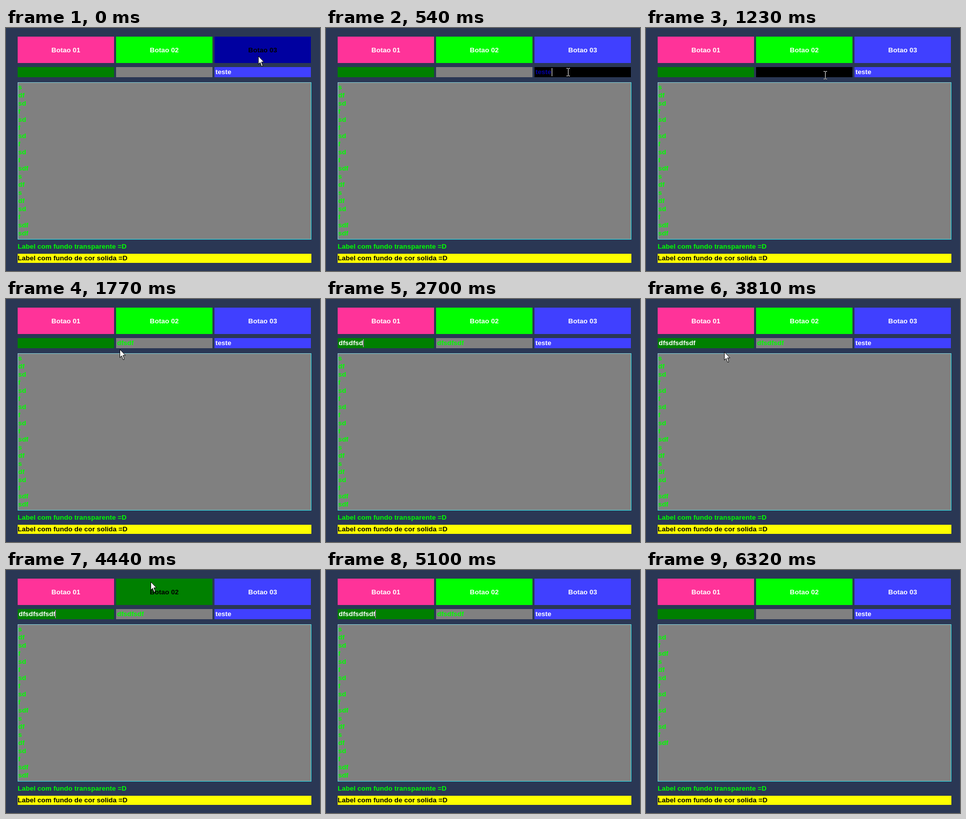
An HTML page that plays this animation: 619 px wide and 479 px high, repeating every 6390 ms.

```html
<!DOCTYPE html>
<html lang="pt">
<head>
<meta charset="utf-8">
<title>Botoes</title>
<style>
  html, body { margin: 0; width: 100%; height: 100%; overflow: hidden; background: #2a3754; }
  svg { display: block; }
  text { font: bold 13.333px "Liberation Sans", Arial, sans-serif; white-space: pre; }
  .wide { letter-spacing: .085px; }
  .invert { mix-blend-mode: difference; }
</style>
</head>
<body>
<svg id="stage" width="619" height="479" viewBox="0 0 619 479"></svg>
<script>
const LOOP = 6390;
const stage = document.getElementById('stage');

function add(tag, attrs, parent = stage) {
  const el = document.createElementNS('http://www.w3.org/2000/svg', tag);
  for (const k in attrs) el.setAttribute(k, attrs[k]);
  parent.append(el);
  return el;
}
const rect = (x, y, width, height, fill) => add('rect', { x, y, width, height, fill });
function label(x, y, fill, str = '', extra = {}) {
  const el = add('text', { x, y, fill, ...extra });
  el.textContent = str;
  return el;
}
const show = (el, on) => el.setAttribute('visibility', on ? 'visible' : 'hidden');

rect(0, 0, 619, 479, '#2a3754');

// Colours: [normal fill, normal text, hover fill, hover text]
const skins = {
  b0: ['#ff3399', '#fff', '#800040', '#000'],
  b1: ['#00ff00', '#fff', '#008000', '#000'],
  b2: ['#4040ff', '#fff', '#0000a0', '#000'],
  t0: ['#008000', '#fff', '#000', '#008000'],
  t1: ['#808080', '#0f0', '#000', '#008000'],
  t2: ['#4040ff', '#fff', '#000', '#0000a0']
};
const left = i => 23 + 194 * i;
const parts = {};
for (let i = 0; i < 3; i++) {
  parts['b' + i] = {
    box: rect(left(i), 17, 190, 52),
    text: label(left(i) + 95, 48, '#fff', 'Botao 0' + (i + 1), { 'text-anchor': 'middle', class: 'wide' })
  };
  parts['t' + i] = { box: rect(left(i), 77, 190, 20), text: label(left(i) + 2, 91, '#fff') };
}
const marked = rect(413, 79, 32, 16, '#3399ff');
const markedText = label(413, 91, '#fff', 'teste');

// Multi-line field
rect(23, 107, 579, 310, '#2ee6ee');
rect(23, 107, 578, 1, '#86d4dc');
rect(23, 107, 1, 309, '#86d4dc');
rect(24, 108, 577, 308, '#808080');
const rows = Array.from({ length: 19 }, (_, i) => label(24, 121 + 16 * i, '#0f0'));

label(23, 435, '#0f0', 'Label com fundo transparente =D', { class: 'wide' });
rect(23, 445, 579, 18, '#ff0');
label(23, 458, '#000', 'Label com fundo de cor solida =D', { class: 'wide' });

const caret = add('rect', { y: 79, width: 1, height: 16, fill: '#fff', class: 'invert' });
const arrow = add('path', {
  d: 'M.5 .5V16.5L4 13L6.8 20.5H8.8V18L6.6 12H11.5Z', fill: '#fff', stroke: '#000'
});
const beam = add('path', {
  d: 'M0 0H3V1H4V0H7V1H4V15H7V16H4V15H3V16H0V15H3V1H0Z', fill: '#fff', class: 'invert'
});

const logA = 's df sd f sd f sd f sd f sdf s df s df sd f sdf sdf'.split(' ');
const logB = ' sd f sdf s df sd f sd f sd f sd f sdf'.split(' ');
const typed = n => 'dfs'.repeat(4).slice(0, n);
const at = (x, y) => ({ arrow: [x, y] });
const ibeam = (x, y) => ({ beam: [x, y] });
const none = {};

// Each step keeps the earlier values it does not set.
const steps = [
  [0, { cur: at(497, 55), hot: 'b2', t0: 0, t1: 0, focus: null, sel: 0, log: logA }],
  [120, { cur: at(491, 71), hot: null }],
  [270, { cur: at(478, 99) }],
  [400, { cur: at(467, 101) }],
  [540, { cur: ibeam(474, 79), hot: 't2', focus: 't2' }],
  [660, { cur: ibeam(402, 85), focus: null, sel: 5 }],
  [810, { cur: ibeam(356, 87) }],
  [960, { cur: ibeam(432, 83), sel: 2 }],
  [1080, { cur: ibeam(478, 79), sel: 0, focus: 't2' }],
  [1230, { cur: ibeam(350, 85), hot: 't1', focus: null }],
  [1350, { cur: ibeam(322, 84), focus: 't1' }],
  [1480, { cur: none, t1: 1 }],
  [1620, { cur: ibeam(322, 84), t1: 5 }],
  [1770, { cur: at(224, 99), hot: null, focus: null }],
  [1900, { cur: ibeam(192, 86), hot: 't0', t1: 8 }],
  [2160, { cur: none, t0: 1, focus: 't0' }],
  [2320, { cur: at(239, 87), hot: null, t0: 2 }],
  [2440, { cur: none, t0: 4 }],
  [2580, { t0: 6 }],
  [2700, { t0: 7 }],
  [2860, { t0: 8 }],
  [3000, { t0: 9 }],
  [3120, { t0: 11 }],
  [3540, { cur: at(126, 52), hot: 'b0', focus: null }],
  [3660, { cur: at(140, 40) }],
  [3810, { cur: at(154, 104), hot: null }],
  [3940, { cur: at(470, 45), hot: 'b2' }],
  [4080, { cur: at(446, 71), hot: null, focus: 't0' }],
  [4200, { cur: at(408, 87) }],
  [4320, { cur: at(330, 14) }],
  [4440, { cur: at(285, 23), hot: 'b1' }],
  [4590, { cur: none, hot: null, focus: null }],
  [4980, { cur: at(604, 413) }],
  [5100, { cur: none, focus: 't0' }],
  [5530, { focus: null }],
  [5940, { t0: 0, t1: 0, log: logB.slice(0, 12) }],
  [6080, { log: logB.slice(0, 13) }],
  [6200, { log: logB.slice(0, 14) }],
  [6320, { log: logB }]
];
let last = {};
const states = steps.map(([, change]) => last = { ...last, ...change });

const advance = { d: .611, f: .333, s: .556 };
function caretX(id, str) {
  if (id === 't2') return 445;
  const w = [...str].reduce((sum, c) => sum + advance[c], 0) * 13.333;
  return left(+id[1]) + 2 + Math.floor(w);
}

function place(el, pos) {
  show(el, pos);
  if (pos) el.setAttribute('transform', `translate(${pos})`);
}

function render(s) {
  const values = { t0: typed(s.t0), t1: typed(s.t1), t2: 'teste' };
  for (const id in parts) {
    const k = s.hot === id ? 2 : 0;
    parts[id].box.setAttribute('fill', skins[id][k]);
    parts[id].text.setAttribute('fill', skins[id][k + 1]);
    if (id in values) parts[id].text.textContent = values[id];
  }
  // The selection grows leftwards from the end of the word.
  const from = s.sel === 5 ? 413 : 432;
  show(marked, s.sel);
  show(markedText, s.sel);
  marked.setAttribute('x', from);
  marked.setAttribute('width', 445 - from);
  markedText.setAttribute('x', from);
  markedText.textContent = 'teste'.slice(5 - s.sel);

  rows.forEach((row, i) => row.textContent = s.log[i] || '');
  show(caret, s.focus);
  if (s.focus) caret.setAttribute('x', caretX(s.focus, values[s.focus]));
  place(arrow, s.cur.arrow);
  place(beam, s.cur.beam);
}

const start = performance.now();
let shown = -1;
function tick() {
  const t = (performance.now() - start) % LOOP;
  const i = steps.findLastIndex(([time]) => time <= t);
  if (i !== shown) render(states[shown = i]);
  requestAnimationFrame(tick);
}
tick();
</script>
</body>
</html>
```
